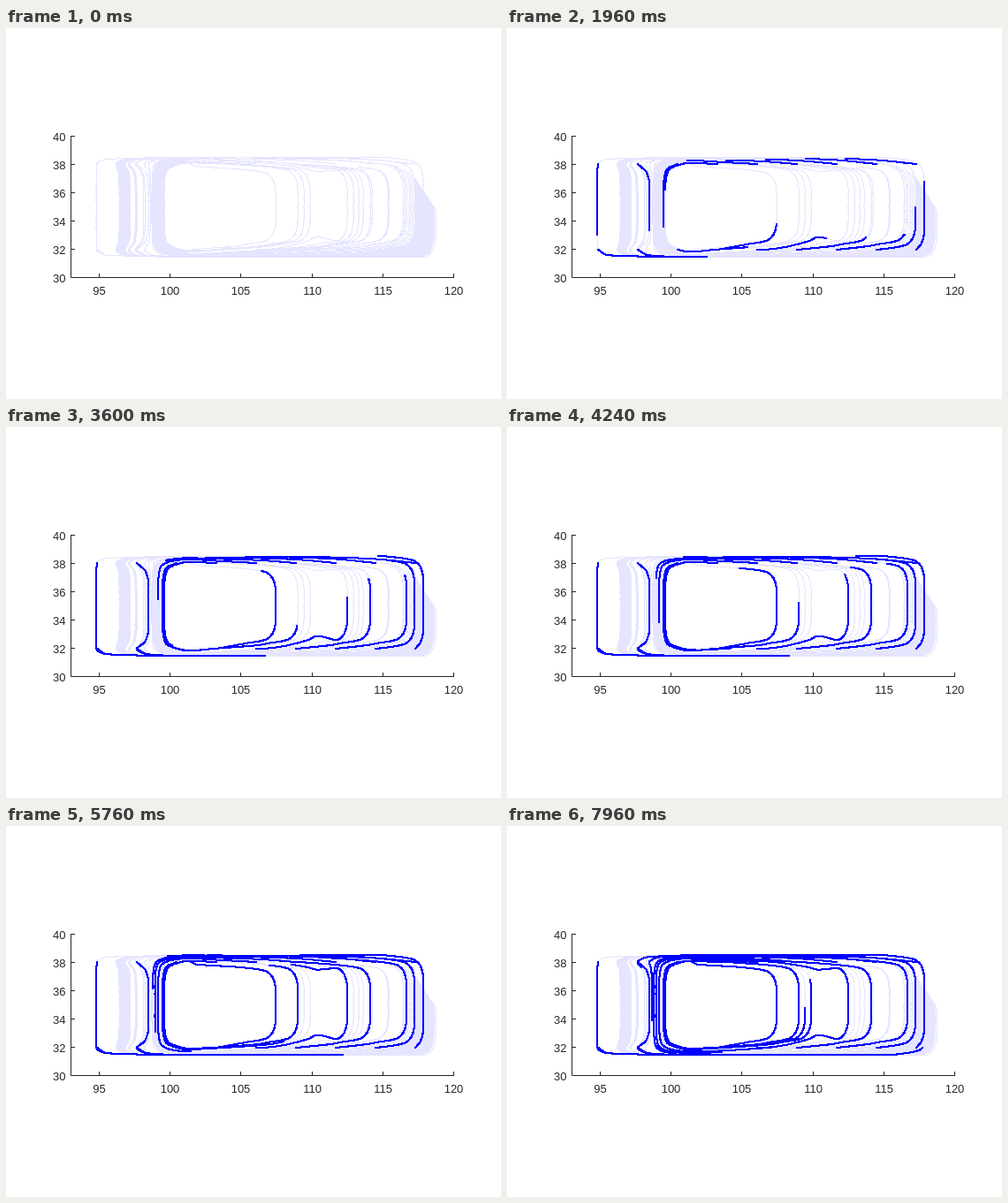
An HTML page with a canvas that plays this animation: 560 px wide and 420 px high, repeating every 8 s.

```html
<!DOCTYPE html>
<html lang="en">
<head>
<meta charset="utf-8">
<title>Streamlines</title>
<style>
html, body { margin: 0; width: 100%; height: 100%; overflow: hidden; background: #fff; }
canvas { display: block; width: 560px; height: 420px; }
</style>
</head>
<body>
<canvas id="stage" width="560" height="420"></canvas>
<script>
const LOOP = 8000, STEP = 40, SPEED = 1.635;
const BLUE = '#00f', PALE = '#e5e5ff', INK = '#262626';
const TOP = 146.4, BOTTOM = 259.3, SEAM = 206;
const ctx = document.getElementById('stage').getContext('2d');

const clamp = (v, lo, hi) => Math.max(lo, Math.min(hi, v));
const span = (from, to, step) =>
  Array.from({ length: Math.floor((to - from) / step) + 1 }, (_, i) => from + i * step);

// Piecewise linear value through [x, y] knots.
function lerp(knots, x) {
  let i = 1;
  while (i < knots.length - 1 && x > knots[i][0]) i++;
  const [x0, y0] = knots[i - 1], [x1, y1] = knots[i];
  return y0 + (y1 - y0) * (x - x0) / (x1 - x0);
}

// Smooth curve without overshoot, as closely spaced points with running length.
function smooth(pts) {
  const n = pts.length, axes = [0, 1], h = [], slope = [];
  for (let i = 0; i < n - 1; i++) {
    const d = axes.map(k => pts[i + 1][k] - pts[i][k]);
    h[i] = Math.hypot(...d);
    slope[i] = d.map(v => v / h[i]);
  }
  const tangent = (i, k) => {
    if (i === 0) return slope[0][k];
    if (i === n - 1) return slope[n - 2][k];
    const a = slope[i - 1][k], b = slope[i][k];
    return a * b <= 0 ? 0 : 2 * a * b / (a + b);
  };
  const line = [{ x: pts[0][0], y: pts[0][1], s: 0 }];
  for (let i = 0; i < n - 1; i++) {
    const parts = Math.ceil(h[i] * 1.6);
    for (let j = 1; j <= parts; j++) {
      const u = j / parts, v = 1 - u;
      const [x, y] = axes.map(k =>
        (1 + 2 * u) * v * v * pts[i][k] + u * u * (3 - 2 * u) * pts[i + 1][k] +
        h[i] * u * v * (v * tangent(i, k) - u * tangent(i + 1, k)));
      const last = line[line.length - 1];
      line.push({ x, y, s: last.s + Math.hypot(x - last.x, y - last.y) });
    }
  }
  return line;
}

// Left turn, downwards: a straight column whose ends are pinched to x = tip.
const pinch = [[102, 102.5], [128, 124], [141, 135], [148, 140], [157, 147.5], [161, 148], [164, 161], [166, 169], [179, 183]];
function left(col) {
  const tip = lerp(pinch, col), bend = (tip + 3 * col) / 4, inner = Math.max(0, col - 164);
  const top = TOP + inner * 0.43, bottom = BOTTOM - inner * 0.5;
  return [[SEAM, top], [tip + 12, top + 2], [tip, top + 8], [bend, top + 17], [col, top + 30],
    [col, bottom - 30], [bend, bottom - 17], [tip, bottom - 8], [tip + 12, bottom - 2], [SEAM, bottom]];
}

// Right turn, upwards: lanes near column 386 dip towards the middle.
function right(col) {
  const low = 241 + 0.55 * Math.max(0, col - 453);
  const high = 161 + 0.12 * Math.max(0, 330 - col) - 0.32 * Math.max(0, col - 440);
  const dip = 8.5 * Math.exp(-(((col - 386) / 6) ** 2));
  const turn = [[col - 90, low + 9.5], [col - 45, low + 6 - 0.65 * dip], [col - 34, low + 4 - dip],
    [col - 12, low], [col - 3, low - 8], [col, low - 21],
    [col, high + 21], [col - 3, high + 8], [col - 12, high],
    [col - 34, high - 3.5 + 0.6 * dip], [col - 45, high - 4.5 + 0.4 * dip], [col - 90, high - 7.5]];
  return turn.map(([x, y]) => [x, clamp(y, TOP, BOTTOM)]);
}

const leftOf = col => 178.5 - (col - 305) * 0.1;
const startX = i => 103 + 45 * i;

// Starts on the upper row, drifts left into one column and on to the next.
function upper(i, col, next) {
  const x0 = startX(i), y0 = 154, turn = left(col);
  const lead = span(45, x0 - SEAM - 20, 45).map(dx =>
    [x0 - dx, turn[0][1] + (y0 - turn[0][1]) * Math.exp(-dx / 50)]);
  const gaps = turn.slice(0, 5).map(([x, y]) => Math.hypot(x - x0, y - y0));
  const nearest = gaps.indexOf(Math.min(...gaps));
  const from = x0 > SEAM ? 0 : nearest + 1;
  return smooth([[x0, y0], ...lead, ...turn.slice(from), ...right(next)]);
}

// Starts on the lower row, drifts right into a column and back along the top.
function lower(i, col) {
  const x0 = startX(i), home = left(leftOf(col));
  const ahead = [home[9], ...right(col)];
  const from = ahead.findIndex(([x]) => x > x0 + 4);
  return smooth([[x0, 251], ...ahead.slice(from), ...home]);
}

const upperLanes = [[102, 486], [161, 484], [177, 344], [179, 337], [172, 393],
  [168.5, 404], [166, 414], [164, 432], [157, 449]];
const lowerLanes = [330, 305, 386, 412, 453, 462, 472];

const tracks = [
  ...upperLanes.map(([col, next], i) => upper(i, col, next)),
  ...[102, 161].map((col, i) =>
    smooth([[startX(i), 251], ...left(col).slice(8), ...right(486 - 9 * i)])),
  ...lowerLanes.map((col, i) => lower(i + 2, col))
];

function paleRight(col) {
  const home = left(leftOf(col));
  return smooth([home[9], ...right(col), home[0]]);
}
const paleLeft = col => smooth(left(col));

const frameLine = smooth([...left(102).slice(0, 6).reverse(),
  [489, TOP], [489, 252], [486, 258], [478, BOTTOM], [300, BOTTOM]]);

const backdrop = [
  ...tracks, frameLine,
  ...[...upperLanes.map(lane => lane[1]), ...lowerLanes, 399, 433, 451, 456, 458, 460].map(paleRight),
  ...span(462, 484, 0.8).map(paleRight),
  ...[...span(128, 141, 0.8), 146, 147, 148, 155.5, 157, 163].map(paleLeft),
  ...span(165.5, 179, 0.8).map(paleLeft)
];

// Crisp lines without smoothing, drawn with a square brush.
function drawLines(g, lines, color, width, length) {
  const shift = width / 2;
  g.fillStyle = color;
  for (const line of lines) {
    for (const p of line) {
      if (p.s > length) break;
      g.fillRect(Math.round(p.x - shift), Math.round(p.y - shift), width, width);
    }
  }
}

function drawAxes(g) {
  g.strokeStyle = g.fillStyle = INK;
  g.lineWidth = 1;
  g.font = '13px "Liberation Sans", Arial, sans-serif';
  g.textBaseline = 'alphabetic';
  g.beginPath();
  g.moveTo(73.5, 122);
  g.lineTo(73.5, 282.5);
  g.lineTo(507, 282.5);
  g.textAlign = 'center';
  for (let v = 95; v <= 120; v += 5) {
    const x = Math.round(104.9 + (v - 95) * 16.05) + 0.5;
    g.moveTo(x, 282);
    g.lineTo(x, 278);
    g.fillText(v, x, 302);
  }
  g.textAlign = 'right';
  for (let v = 30; v <= 40; v += 2) {
    const y = 282.5 - (v - 30) * 16;
    g.moveTo(74, y);
    g.lineTo(78, y);
    g.fillText(v, 67.5, y + 5.5);
  }
  g.stroke();
}

const base = document.createElement('canvas');
base.width = 560;
base.height = 420;
const baseCtx = base.getContext('2d');
baseCtx.fillStyle = '#fff';
baseCtx.fillRect(0, 0, 560, 420);
drawLines(baseCtx, backdrop, PALE, 1, LOOP / STEP * SPEED);
drawAxes(baseCtx);

function frame() {
  const step = Math.floor(performance.now() % LOOP / STEP);
  ctx.drawImage(base, 0, 0);
  if (step > 0) drawLines(ctx, tracks, BLUE, 2, step * SPEED);
  requestAnimationFrame(frame);
}
frame();
</script>
</body>
</html>
```
